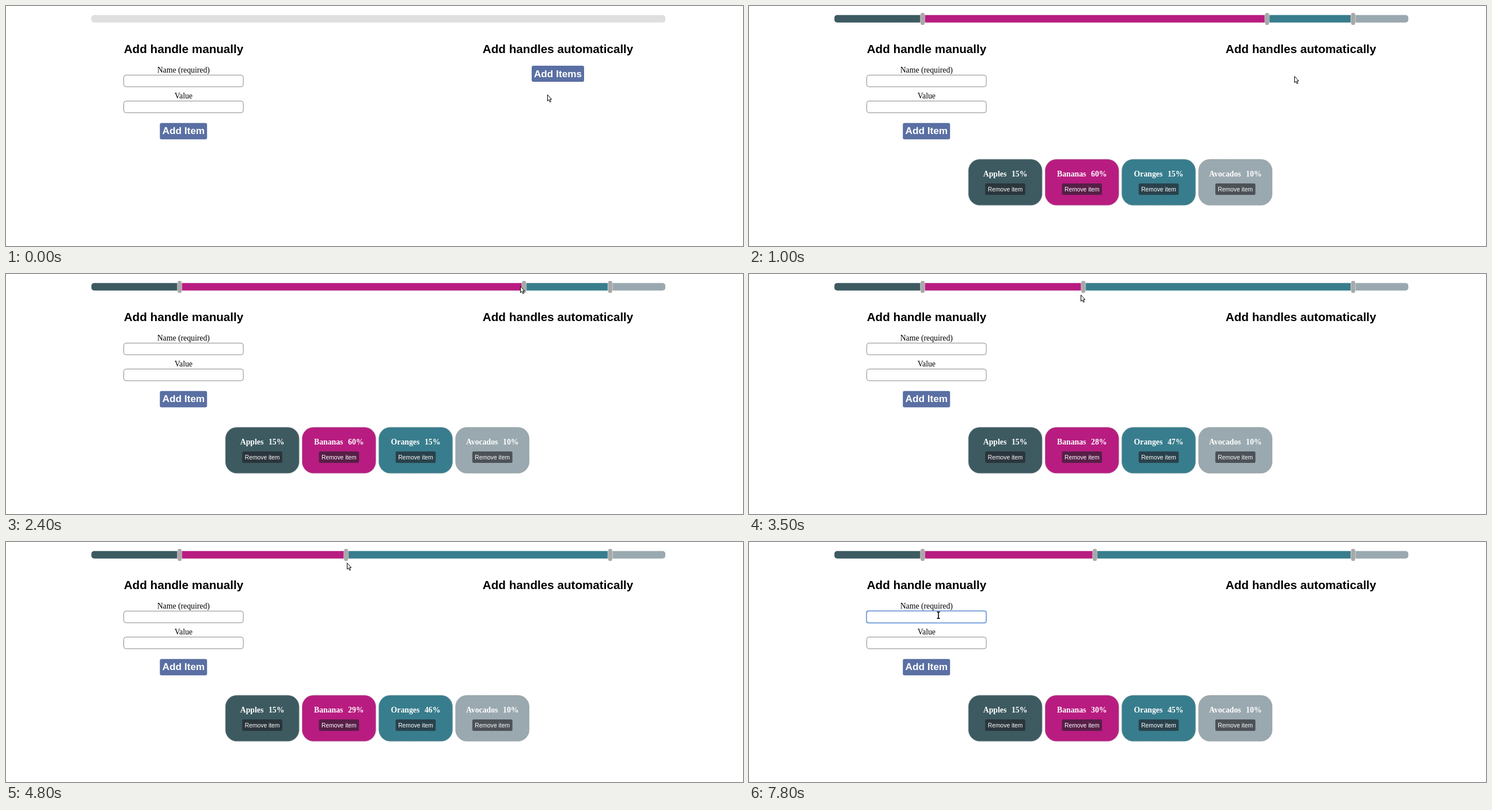
These frames come from a looping animation (1280x418 px, 8000 ms). An HTML page:

```html
<!DOCTYPE html>
<html lang="en">
<head>
<meta charset="utf-8">
<title>Slider with handles</title>
<style>
  html, body { margin: 0; width: 100%; height: 100%; overflow: hidden; background: #fff; }
  svg { display: block; width: 1280px; height: 418px; }
  text { text-anchor: middle; font-family: "Liberation Serif", Tinos, serif; font-size: 13.75px; }
  .title, .action, .small { font-family: "Liberation Sans", Arimo, sans-serif; }
  .title { font-size: 20.65px; font-weight: bold; }
  .action { font-size: 17.2px; font-weight: bold; fill: #fff; }
  .small { font-size: 10.3px; fill: #fff; }
  .item { font-weight: bold; fill: #fff; }
  .button { fill: #5a6fa3; }
  .field { fill: #fff; stroke: #767676; stroke-width: .86; }
  .ring { fill: none; stroke: #6d9ee6; stroke-width: 1.5; }
  .handle { fill: #a9a9a9; }
  .halo { fill: #fff; opacity: .5; }
  .remove { fill: rgba(34, 34, 40, .64); }
  .dots { fill: none; stroke: #a9a9a9; stroke-width: .86; stroke-dasharray: .86; }
</style>
</head>
<body>
<svg viewBox="0 0 1280 418">
  <defs>
    <clipPath id="track"><rect x="148.2" y="15.8" width="997" height="13" rx="5"/></clipPath>
  </defs>

  <rect x="148.2" y="15.8" width="997" height="13" rx="5" fill="#dfdfdf"/>
  <g id="slider"><g id="parts" clip-path="url(#track)"></g></g>

  <text class="title" x="308.5" y="82">Add handle manually</text>
  <text x="308.3" y="116">Name (required)</text>
  <rect class="field" x="204.5" y="120.3" width="207.6" height="20.4" rx="4"/>
  <g id="focus">
    <rect class="ring" x="204" y="120" width="208" height="21" rx="3"/>
    <rect id="caret" x="223" y="122" width="1" height="17"/>
  </g>
  <text x="308.3" y="161">Value</text>
  <rect class="field" x="204.5" y="165.5" width="207.6" height="20.4" rx="4"/>
  <rect class="button" x="267.2" y="203.8" width="82" height="28.5" rx="3"/>
  <text class="action" x="308.3" y="223">Add Item</text>

  <text class="title" x="958.6" y="82">Add handles automatically</text>
  <g id="auto">
    <rect class="button" x="913" y="104" width="91" height="28" rx="3"/>
    <rect class="ring" id="pressed" x="912.5" y="103.5" width="92" height="29" rx="2.5"/>
    <text class="action" x="958.5" y="123.5">Add Items</text>
  </g>

  <g id="cards"></g>

  <path id="arrow" d="M.5 .6V11.4L2.9 9.2L4.6 13.3L6.4 12.5L4.7 8.6H7.7Z" fill="#fff" stroke="#000"/>
  <path id="beam" d="M326.5 122H331.5M329 122V133M326.5 133H331.5" fill="none" stroke="#222" stroke-width="1.8"/>
</svg>

<script>
const $ = id => document.getElementById(id);
const LOOP = 8000, STEP = 100, LEFT = 148.2, PERCENT = 9.97;

function add(parent, tag, attrs, text) {
  const el = document.createElementNS("http://www.w3.org/2000/svg", tag);
  for (const key in attrs) el.setAttribute(key, attrs[key]);
  if (text) el.textContent = text;
  return parent.appendChild(el);
}
const show = (el, on) => el.setAttribute("visibility", on ? "inherit" : "hidden");

const items = [
  { name: "Apples", color: "#3d5a61" },
  { name: "Bananas", color: "#b81c80" },
  { name: "Oranges", color: "#387d8d" },
  { name: "Avocados", color: "#9aa9af" }
];

items.forEach((item, i) => {
  const x = 380.9 + i * 133.2, mid = x + 64.2;
  const cards = $("cards");
  item.part = add($("parts"), "rect", { y: 15, height: 14, fill: item.color });
  add(cards, "rect", { x, y: 266.8, width: 128.4, height: 80.4, rx: 20, fill: item.color });
  add(cards, "rect", { class: "dots", x: x + .43, y: 267.23, width: 127.5, height: 79.5, rx: 19.5 });
  const line = add(cards, "text", { class: "item", x: mid, y: 297 });
  add(line, "tspan", {}, item.name);
  item.value = add(line, "tspan", { dx: 8.6 });
  add(cards, "rect", { class: "remove", x: mid - 34.8, y: 309, width: 69.6, height: 20, rx: 2.5 });
  add(cards, "text", { class: "small", x: mid, y: 323 }, "Remove item");
  if (i < 3) {
    item.handle = add($("slider"), "g", {});
    add(item.handle, "rect", { class: "halo", x: -1, y: 12, width: 9, height: 21, rx: 3 });
    add(item.handle, "rect", { class: "handle", y: 12, width: 7, height: 21, rx: 3 });
  }
});

// pointer glides along cubic curves
const glides = [
  { from: 100, to: 400, path: [[940, 154], [942, 146], [945, 132], [947, 122]] },
  { from: 1100, to: 2000, path: [[947, 122], [890, 123], [880, 37], [995, 37]] },
  { from: 2000, to: 2400, path: [[995, 37], [970, 20], [930, 15], [893, 21]] }
];
// while dragging: when, share of bananas, pointer x
const drags = [
  { at: 3500, share: 28, x: 576 },
  { at: 3900, share: 27, x: 567 },
  { at: 4400, share: 28, x: 580 },
  { at: 4800, share: 29, x: 592 },
  { at: 5300, share: 30, x: 611 }
];

function curve(path, u) {
  const v = 1 - u;
  return [0, 1].map(k =>
    v ** 3 * path[0][k] + 3 * v * v * u * path[1][k] + 3 * v * u * u * path[2][k] + u ** 3 * path[3][k]);
}

function pointerAt(t, drag) {
  if (t >= 5700) return [1038, 19];
  if (drag) return [drag.x, 36];
  const now = Math.floor(t / STEP) * STEP;
  const glide = glides.findLast(g => g.from <= now) || glides[0];
  const u = (now - glide.from) / (glide.to - glide.from);
  return curve(glide.path, Math.min(1, Math.max(0, u)));
}

function draw(t) {
  const drag = drags.findLast(d => d.at <= t);
  const share = drag ? drag.share : 60;
  const [x, y] = pointerAt(t, drag).map(Math.round);
  const filled = t >= 1000, inField = t >= 6800;

  $("arrow").setAttribute("transform", `translate(${x} ${y})`);
  show($("arrow"), !inField);
  show($("beam"), inField);
  show($("auto"), !filled);
  show($("pressed"), t >= 900 && !filled);
  show($("slider"), filled);
  show($("cards"), filled);
  show($("focus"), t >= 7300);
  show($("caret"), t >= 7300 && t < 7800);

  let start = LEFT;
  [15, share, 75 - share, 10].forEach((percent, i) => {
    const { part, value, handle } = items[i];
    const width = percent * PERCENT;
    part.setAttribute("x", start);
    part.setAttribute("width", width);
    value.textContent = percent + "%";
    start += width;
    if (handle) handle.setAttribute("transform", `translate(${start + .3} 0)`);
  });
}

function tick() {
  draw(performance.now() % LOOP);
  requestAnimationFrame(tick);
}
tick();
</script>
</body>
</html>
```
